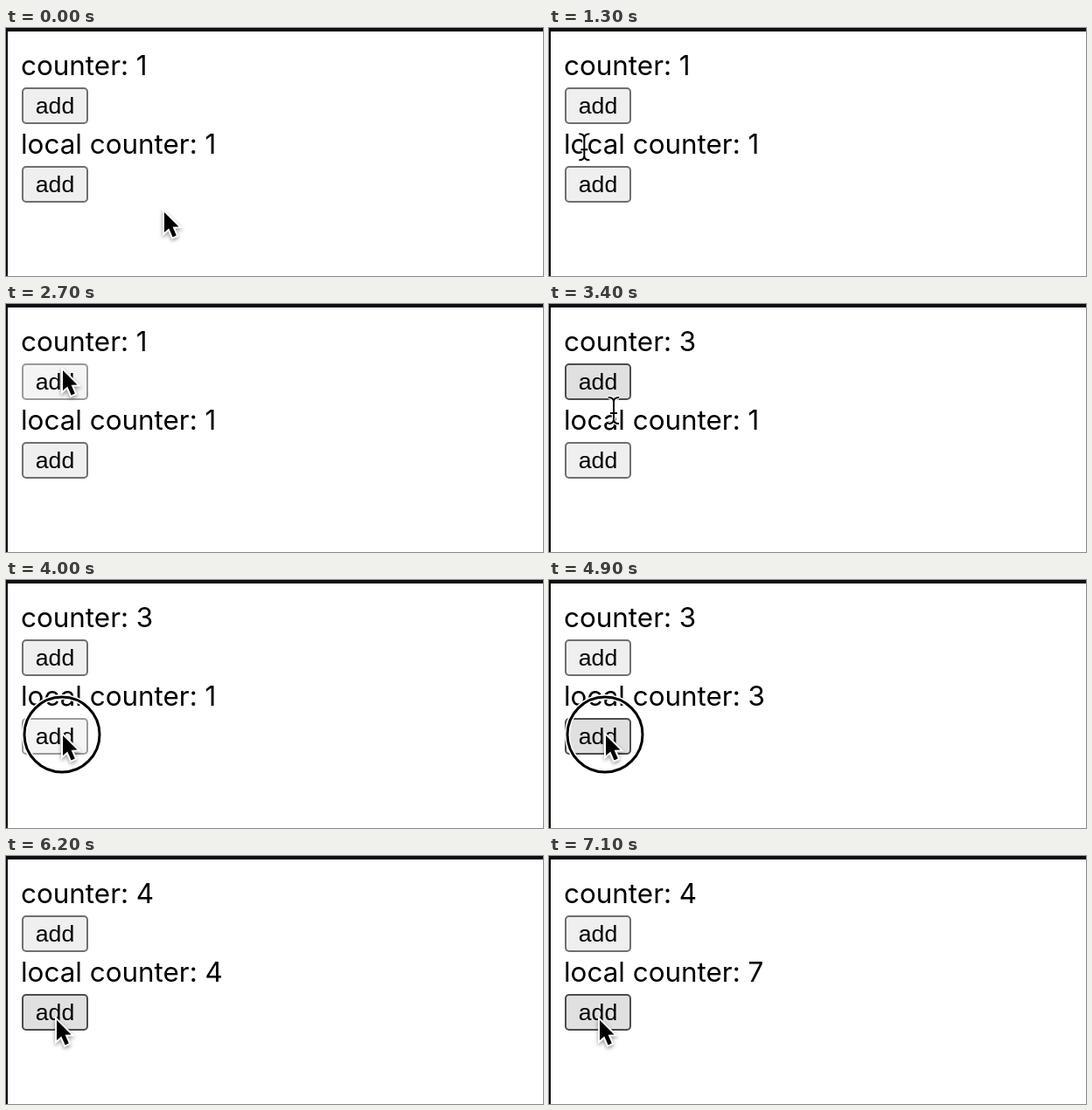
Recreate the animation shown at these times as an HTML page with a canvas. Size 614 by 284 pixels, loop 8.9 s.

```html
<!DOCTYPE html>
<html lang="en">
<head>
<meta charset="utf-8">
<title>Counters</title>
<style>
html, body { margin: 0; width: 100%; height: 100%; overflow: hidden; background: #fff; }
canvas { display: block; }
</style>
</head>
<body>
<canvas id="stage" width="614" height="284"></canvas>
<script>
const ctx = document.getElementById('stage').getContext('2d');
const LOOP = 8900, STEP = 100, HOLD = 200, SWEEP = 900;

const rows = [
  { label: 'counter', top: 20, right: 170 },
  { label: 'local counter', top: 110, right: 250 }
];

// The pointer sweeps from rest over each label, then glides from stop to stop
const rest = { x: 180, y: 207 };
const stops = [
  { start: 2200, x: 117, y: 29 },
  { start: 2600, x: 64, y: 72, row: 0, clicks: 2, gap: 300, rings: 0 },
  { start: 3400, x: 74, y: 122 },
  { start: 3900, x: 64, y: 174, row: 1, clicks: 3, gap: 500, rings: 3 },
  { start: 5500, x: 57, y: 90, row: 0, clicks: 1, gap: 0, rings: 1 },
  { start: 6200, x: 57, y: 184 },
  { start: 6300, x: 57, y: 184, row: 1, clicks: 3, gap: 300, rings: 2 }
];

const clicks = stops.flatMap(({ start, row, clicks = 0, gap, rings }) =>
  Array.from({ length: clicks }, (_, i) => {
    const down = start + i * gap;
    return { row, down, up: down + HOLD, ring: i < rings };
  }));

const leaveTime = s => s.clicks ? s.start + (s.clicks - 1) * s.gap + HOLD : s.start;
const smooth = k => k * k * (3 - 2 * k);
const mix = (a, b, k) => ({ x: a.x + (b.x - a.x) * k, y: a.y + (b.y - a.y) * k });

function pointerAt(t) {
  if (t < SWEEP * rows.length) {
    const row = rows[Math.max(0, Math.floor(t / SWEEP))];
    return mix(rest, { x: 36, y: row.top + 24 }, Math.sin(Math.PI * t / SWEEP) ** 2);
  }
  let from = rest, left = SWEEP * rows.length;
  for (const stop of stops) {
    if (t < stop.start) {
      const k = Math.max(0, (t - left) / (stop.start - left));
      return mix(from, stop, smooth(k));
    }
    from = stop;
    left = leaveTime(stop);
  }
  return from;
}

const pressedAt = t => clicks.find(c => t >= c.down && t < c.up);

function overButton(p, row) {
  return p.x >= 18 && p.x <= 94 && p.y >= row.top + 48 && p.y <= row.top + 90;
}

function overText(p, row) {
  return p.x >= 16 && p.x < row.right && p.y > row.top - 8 && p.y < row.top + 46;
}

function drawButton(top, state) {
  const [fill, border] = {
    idle: ['#efefef', '#6f6f6f'],
    hover: ['#e0e0e0', '#4c4c4c'],
    active: ['#f4f4f4', '#9a9a9a']
  }[state];
  ctx.beginPath();
  ctx.roundRect(19, top + 1, 74, 40, 4);
  ctx.fillStyle = fill;
  ctx.fill();
  ctx.strokeStyle = border;
  ctx.lineWidth = 2;
  ctx.stroke();
  ctx.fillStyle = '#000';
  ctx.font = '26.667px "Liberation Sans", Arial, sans-serif';
  ctx.textAlign = 'center';
  ctx.fillText('add', 56, top + 30);
}

function drawRow(row, index, t) {
  const count = 1 + clicks.filter(c => c.row === index && t >= c.up).length;
  ctx.fillStyle = '#000';
  ctx.font = '31.4px Inter, sans-serif';
  ctx.textAlign = 'left';
  ctx.fillText(`${row.label}: ${count}`, 17, row.top + 34);

  // The page reacts one step after the pointer
  const press = pressedAt(t);
  const active = press && press.row === index && pressedAt(t - STEP) === press;
  const hover = overButton(pointerAt(t - STEP), row);
  drawButton(row.top + 48, active ? 'active' : hover ? 'hover' : 'idle');
}

function outlined(color, width, halo) {
  ctx.strokeStyle = '#fff';
  ctx.lineWidth = width + halo;
  ctx.stroke();
  ctx.strokeStyle = color;
  ctx.lineWidth = width;
  ctx.stroke();
}

function drawRing({ x, y }) {
  ctx.beginPath();
  ctx.arc(x, y + 3, 43, 0, Math.PI * 2);
  outlined('#000', 3, 3);
}

function drawArrow({ x, y }) {
  const shape = [[0, 0], [0, 23], [5.3, 18.4], [9.6, 28.4], [13.8, 26.5], [9.6, 16.8], [16.5, 16.5]];
  ctx.save();
  ctx.translate(x + 1, y + 4);
  ctx.beginPath();
  shape.forEach(([px, py]) => ctx.lineTo(px, py));
  ctx.closePath();
  ctx.shadowColor = 'rgba(0,0,0,.4)';
  ctx.shadowBlur = 4;
  ctx.shadowOffsetY = 2;
  ctx.strokeStyle = '#fff';
  ctx.lineWidth = 4;
  ctx.stroke();
  ctx.shadowColor = 'transparent';
  ctx.fillStyle = '#000';
  ctx.fill();
  ctx.restore();
}

function drawBeam({ x, y }) {
  ctx.save();
  ctx.translate(x, y);
  ctx.beginPath();
  for (const s of [-1, 1]) {
    ctx.moveTo(-6, 15 * s);
    ctx.quadraticCurveTo(0, 15 * s, 0, 10 * s);
    ctx.quadraticCurveTo(0, 15 * s, 6, 15 * s);
  }
  ctx.moveTo(0, -11);
  ctx.lineTo(0, 11);
  ctx.moveTo(-4, 3);
  ctx.lineTo(4, 3);
  outlined('#000', 2, 2.5);
  ctx.restore();
}

function draw(t) {
  ctx.fillStyle = '#fff';
  ctx.fillRect(0, 0, 614, 284);
  ctx.fillStyle = '#0d0b10';
  ctx.fillRect(0, 0, 614, 4);
  ctx.fillRect(0, 0, 2, 284);
  rows.forEach((row, i) => drawRow(row, i, t));

  const pointer = pointerAt(t), press = pressedAt(t);
  if (press && press.ring) drawRing(pointer);
  if (rows.some(row => overText(pointer, row))) drawBeam(pointer);
  else drawArrow(pointer);
}

const start = performance.now();
function tick() {
  const t = (performance.now() - start) % LOOP;
  draw(Math.floor(t / STEP) * STEP);
  requestAnimationFrame(tick);
}
tick();
</script>
</body>
</html>
```
